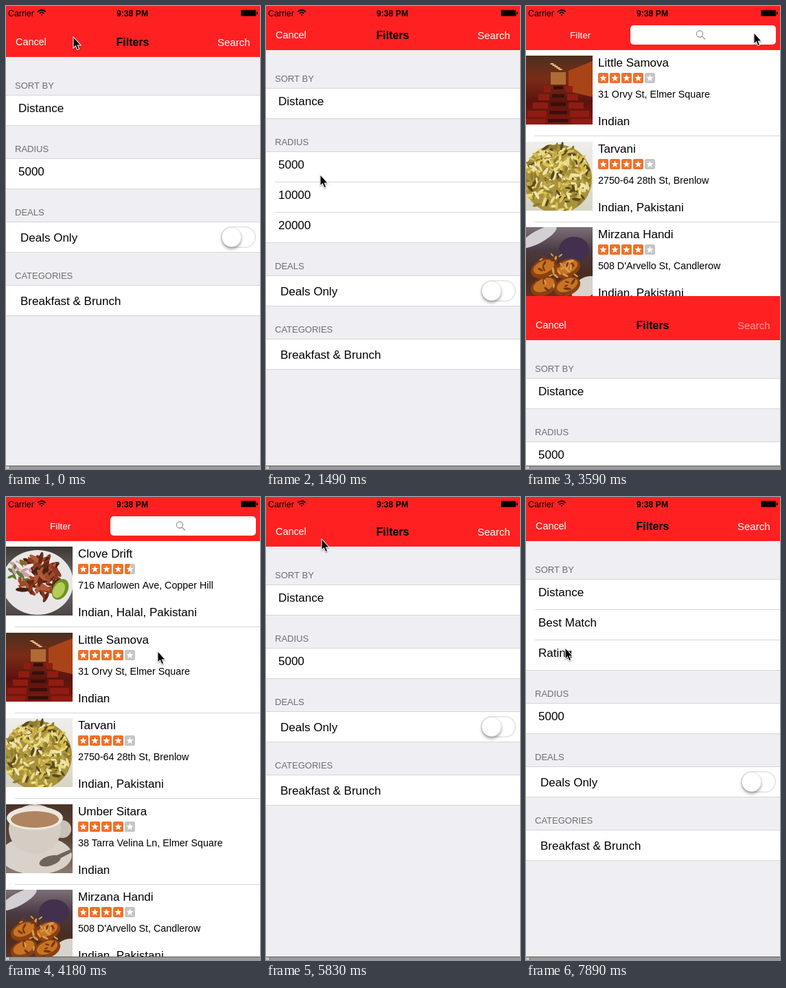
These frames come from a looping animation (370 px wide and 672 px high, 8 s). An HTML page with a canvas:

```html
<!DOCTYPE html>
<html lang="en">
<head>
<meta charset="utf-8">
<title>Restaurant filters</title>
<style>
  html, body { margin: 0; width: 100%; height: 100%; overflow: hidden; background: #fff; }
  canvas { display: block; }
</style>
</head>
<body>
<canvas id="stage" width="370" height="672"></canvas>
<script>
const ctx = document.getElementById('stage').getContext('2d');
const LOOP = 8000, STEP = 148.85, SCREEN = 667, NAV = 64, ROW = 44, GAP = 48;
const RED = '#ff2121', LINE = '#d6d5da';

// --- Drawing helpers ---
function rect(color, x, y, w, h) {
  ctx.fillStyle = color;
  ctx.fillRect(x, y, w, h);
}
function round(color, x, y, w, h, r) {
  ctx.fillStyle = color;
  ctx.beginPath();
  ctx.roundRect(x, y, w, h, r);
  ctx.fill();
}
function oval(color, x, y, rx, ry = rx, turn = 0) {
  ctx.fillStyle = color;
  ctx.beginPath();
  ctx.ellipse(x, y, rx, ry, turn, 0, 7);
  ctx.fill();
}
function poly(color, ...p) {
  ctx.fillStyle = color;
  ctx.beginPath();
  for (let i = 0; i < p.length; i += 2) ctx.lineTo(p[i], p[i + 1]);
  ctx.closePath();
  ctx.fill();
}
function text(str, x, y, size = 17, color = '#000', weight = '', align = 'left') {
  ctx.font = `${weight} ${size}px "Liberation Sans", Arial, sans-serif`;
  ctx.fillStyle = color;
  ctx.textAlign = align;
  ctx.fillText(str, x, y);
}
function clipped(x, y, w, h, draw) {
  ctx.save();
  ctx.beginPath();
  ctx.rect(x, y, w, h);
  ctx.clip();
  draw();
  ctx.restore();
}

// --- Photo stand-ins, each 97 by 100 ---
// Soft background running from top to bottom
function fade(...colors) {
  const g = ctx.createLinearGradient(0, 0, 0, 100);
  colors.forEach((c, i) => g.addColorStop(i / (colors.length - 1), c));
  rect(g, 0, 0, 97, 100);
}
// Seeded specks spread over a disc
function scatter(colors, count, x, y, radius, size) {
  let seed = 7;
  const rnd = () => (seed = seed * 16807 % 2147483647) / 2147483647;
  for (let i = 0; i < count; i++) {
    const a = rnd() * 6.28, d = radius * Math.sqrt(rnd());
    const long = size * (.6 + rnd() * .6);
    oval(colors[i % colors.length], x + d * Math.cos(a), y + d * Math.sin(a), long, long / 3, rnd() * 3);
  }
}
const photos = {
  room() {
    fade('#4b3020', '#7a2c16', '#5c130d', '#7e1810');
    poly('#a84418', 97, 8, 62, 22, 62, 52, 97, 60);
    rect('#b06a34', 36, 24, 22, 18);
    for (let i = 0; i < 5; i++) {
      const w = 10 + i * 6, y = 44 + i * 12;
      rect('#8f1c12', 36 - w - i * 2, y, w, 9);
      rect('#8f1c12', 58 + i * 2, y, w, 9);
      rect('#38100b', 40 - i * 2, y, 14 + i * 4, 5);
      oval('#f0cf8c', 38 + i * 3, 12 + i * 2, 3, 1);
    }
  },
  rice() {
    fade('#efeeea', '#d8d4c4');
    oval('#a8923c', 46, 54, 50);
    scatter(['#d9c050', '#eadb86', '#8f7c30', '#c4aa46', '#f0e4ac', '#5a4a20'], 260, 46, 54, 49, 6);
  },
  karahi() {
    fade('#7d7078', '#4a3a44', '#4a2c20', '#5a3424');
    oval('#d4cfd2', 18, 14, 30, 9, -.5);
    oval('#43304f', 70, 32, 22, 18);
    oval('#d8d2cc', 86, 88, 22, 14, -.6);
    for (let i = 0; i < 4; i++) {
      const x = 26 + i % 2 * 34, y = 58 + (i >> 1) * 26;
      oval('#8c4012', x, y + 2, 20, 13, -.4);
      oval('#c77422', x, y, 16, 9, -.4);
    }
    scatter(['#d99a4c', '#7a3412'], 40, 42, 70, 32, 5);
  },
  grill() {
    fade('#3c3634', '#77706e', '#4a4442');
    oval('#e9e6e8', 46, 52, 52, 47);
    scatter(['#8a3a20', '#6a2816', '#b05a38', '#47200f', '#a04a2c'], 110, 47, 46, 30, 9);
    scatter(['#f0e3e4', '#caa0a8', '#5f7a30'], 30, 20, 40, 17, 8);
    oval('#6f9422', 79, 62, 11, 16, .5);
    oval('#b4cc5a', 77, 63, 8, 12, .5);
  },
  tea() {
    fade('#4a342a', '#5a4438', '#8a7a6e');
    oval('#d8d2ca', 44, 74, 52, 28);
    oval('#c9c0b6', 82, 36, 13);
    oval('#d5cdc3', 42, 36, 38, 36);
    oval('#ece7e0', 42, 20, 41, 17);
    oval('#b08460', 42, 22, 35, 12);
    oval('#6f645c', 64, 82, 16, 7, -.3);
    poly('#6f645c', 74, 74, 97, 64, 97, 69, 76, 80);
  }
};

const places = {
  samova: ['Little Samova', '31 Orvy St, Elmer Square', 'Indian', 4, 'room'],
  tarvani: ['Tarvani', '2750-64 28th St, Brenlow', 'Indian, Pakistani', 4, 'rice'],
  mirzana: ['Mirzana Handi', "508 D'Arvello St, Candlerow", 'Indian, Pakistani', 4, 'karahi'],
  clove: ['Clove Drift', '716 Marlowen Ave, Copper Hill', 'Indian, Halal, Pakistani', 4.5, 'grill'],
  umber: ['Umber Sitara', '38 Tarra Velina Ln, Elmer Square', 'Indian', 4, 'tea']
};
const before = ['samova', 'tarvani', 'mirzana', 'clove', 'umber'];
const after = ['clove', 'samova', 'tarvani', 'umber', 'mirzana'];

// --- Timing ---
const between = (t, from, to) => t >= from && t < to;
function ramp(t, from, ms) {
  const p = Math.min(1, Math.max(0, (t - from) / ms));
  return p * p * (3 - 2 * p);
}
// Critically damped spring, from 1 to 0
function spring(ms) {
  const x = Math.max(0, ms) * .01826;
  return (1 + x) * Math.exp(-x);
}
// The sheet settles, leaves, and comes back
function sheetTop(t) {
  const part = t < 3000 ? spring(t + 338) : t < 5000 ? 1 - spring(t - 3455) : spring(t - 5450.4);
  return Math.round(SCREEN * part);
}

// Places where the pointer rests: time, x, y
const stops = [
  [0, 98, 46], [1480, 79, 246], [2390, 79, 242], [3290, 332, 40], [3580, 332, 40],
  [4160, 221, 225], [4330, 221, 225], [5500, 82, 48], [6690, 77, 136], [7880, 57, 220], [LOOP, 57, 220]
];
function cursorAt(t) {
  const i = stops.findIndex(s => s[0] > t);
  const [t0, x0, y0] = stops[i - 1], [t1, x1, y1] = stops[i];
  const p = ramp(t, t0, t1 - t0);
  return [Math.round(x0 + (x1 - x0) * p), Math.round(y0 + (y1 - y0) * p)];
}

// --- Screen parts ---
function star(x, y) {
  const points = [];
  for (let k = 0; k < 10; k++) {
    const r = k % 2 ? 2.3 : 5.4, a = k * Math.PI / 5;
    points.push(x + r * Math.sin(a), y - r * Math.cos(a));
  }
  poly('#fff', ...points);
}
function rating(x, y, score) {
  for (let i = 0; i < 5; i++, x += 17) {
    round('#c6c6c6', x, y, 15, 15, 2.5);
    clipped(x, y, 15 * Math.min(1, Math.max(0, score - i)), 15, () => round('#f0702a', x, y, 15, 15, 2.5));
    star(x + 7.5, y + 7.8);
  }
}

function place([name, address, kind, score, photo], y) {
  const top = Math.round(y + 8);
  clipped(0, top, 97, 100, () => {
    ctx.translate(0, top);
    photos[photo]();
  });
  text(name, 105, y + 24);
  rating(105, top + 25, score);
  text(address, 105, y + 69, 14.3);
  text(kind, 105, y + 109);
  rect(LINE, 13, Math.round(y + 124), 357, 1);
}

function results(t) {
  rect('#fff', 0, 0, 370, 672);
  (t < 4000 ? before : after).forEach((id, i) => place(places[id], NAV + i * 124.5));
  rect(RED, 0, 0, 370, NAV);
  text('Filter', 64, 47, 13.7, between(t, 5350, 6000) ? '#ff7070' : '#fff');
  round('#fff', 152, 28, 212, 28, 5);
  ctx.strokeStyle = '#8e8e93';
  ctx.lineWidth = 1.1;
  ctx.beginPath();
  ctx.arc(253, 40.5, 4.6, 0, 7);
  ctx.moveTo(256.3, 43.8);
  ctx.lineTo(261, 48.5);
  ctx.stroke();
}

// A titled group of rows; returns its lower edge
function section(title, rows, y, open = 0, x = 18, base = 25) {
  const height = Math.round(ROW * (1 + (rows.length - 1) * open));
  text(title, 13, y - 9, 13, '#6d6d72');
  rect('#fff', 0, y, 370, height);
  clipped(0, y, 370, height, () => rows.forEach((row, i) => {
    text(row, x, y + base + i * ROW);
    if (i) rect(LINE, 13, y + i * ROW, 357, 1);
  }));
  rect(LINE, 0, y, 370, 1);
  rect(LINE, 0, y + height, 370, 1);
  return y + height;
}

function toggle(x, y) {
  ctx.strokeStyle = '#e2e2e2';
  ctx.lineWidth = 1.5;
  ctx.beginPath();
  ctx.roundRect(x + .75, y + .75, 49.5, 29.5, 15);
  ctx.stroke();
  ctx.save();
  ctx.shadowColor = 'rgba(0,0,0,.35)';
  ctx.shadowBlur = 4;
  ctx.shadowOffsetY = 3;
  oval('#fff', x + 15.5, y + 15.5, 14.2);
  ctx.restore();
  ctx.strokeStyle = '#d2d2d2';
  ctx.lineWidth = .6;
  ctx.stroke();
}

function filters(t) {
  const top = sheetTop(t);
  if (top >= SCREEN) return;
  const radiusOpen = ramp(t, 1180, 300) - ramp(t, 2370, 300);
  const sortOpen = ramp(t, 6800, 300);
  ctx.save();
  ctx.translate(0, top);
  rect('#eeeef3', 0, 0, 370, 672);
  rect(RED, 0, 0, 370, NAV);
  text('Cancel', 14, 47, 14.4, '#fff');
  text('Filters', 184.5, 48, 16, '#000', 'bold', 'center');
  text('Search', 355.5, 48, 15, between(t, 3420, 4000) ? '#ff9c9c' : '#fff', '', 'right');
  let y = section('SORT BY', ['Distance', 'Best Match', 'Rating'], 119, sortOpen);
  y = section('RADIUS', ['5000', '10000', '20000'], y + GAP, radiusOpen);
  y = section('DEALS', ['Deals Only'], y + GAP, 0, 21, 29);
  toggle(313, y - 37);
  section('CATEGORIES', ['Breakfast & Brunch'], y + GAP, 0, 21, 29);
  ctx.restore();
}

function statusBar() {
  text('Carrier', 3, 14.5, 12.4);
  text('9:38 PM', 184, 14.5, 12.2, '#000', 'bold', 'center');
  ctx.strokeStyle = '#000';
  ctx.lineWidth = 1.8;
  for (const r of [1, 4.6, 8]) {
    ctx.beginPath();
    ctx.arc(52, 14, r, -2.38, -.76);
    ctx.stroke();
  }
  round('rgba(0,0,0,.6)', 342, 5.5, 22.5, 9.5, 1.5);
  round('#000', 343, 6.5, 20.5, 7.5, 1);
  round('#000', 365, 8.5, 1.7, 3.5, 1);
}

function windowEdge() {
  rect('#9b9b9b', 0, SCREEN, 370, 5);
  rect('#5e5e5e', 0, SCREEN, 370, 1);
  rect('#c4c4c4', 0, SCREEN + 1, 5, 4);
  rect('#6b6b6b', 5, SCREEN + 1, 1, 4);
}

function cursor(t) {
  const arrow = [.5, 0, .5, 14, 3.6, 11, 6.2, 17, 8, 16.2, 5.5, 10.5, 10, 10.5];
  ctx.save();
  ctx.translate(...cursorAt(t));
  ctx.shadowColor = 'rgba(0,0,0,.35)';
  ctx.shadowBlur = 2;
  ctx.shadowOffsetY = 1;
  ctx.strokeStyle = '#fff';
  ctx.lineWidth = 2;
  poly('#fff', ...arrow);
  ctx.stroke();
  ctx.shadowColor = 'transparent';
  poly('#000', ...arrow);
  ctx.restore();
}

function draw(now) {
  // Each pose is held for one step
  const t = Math.floor(Math.max(0, now - begin) % LOOP / STEP) * STEP;
  results(t);
  filters(t);
  statusBar();
  windowEdge();
  cursor(t);
  requestAnimationFrame(draw);
}
const begin = performance.now();
draw(begin);
</script>
</body>
</html>
```
